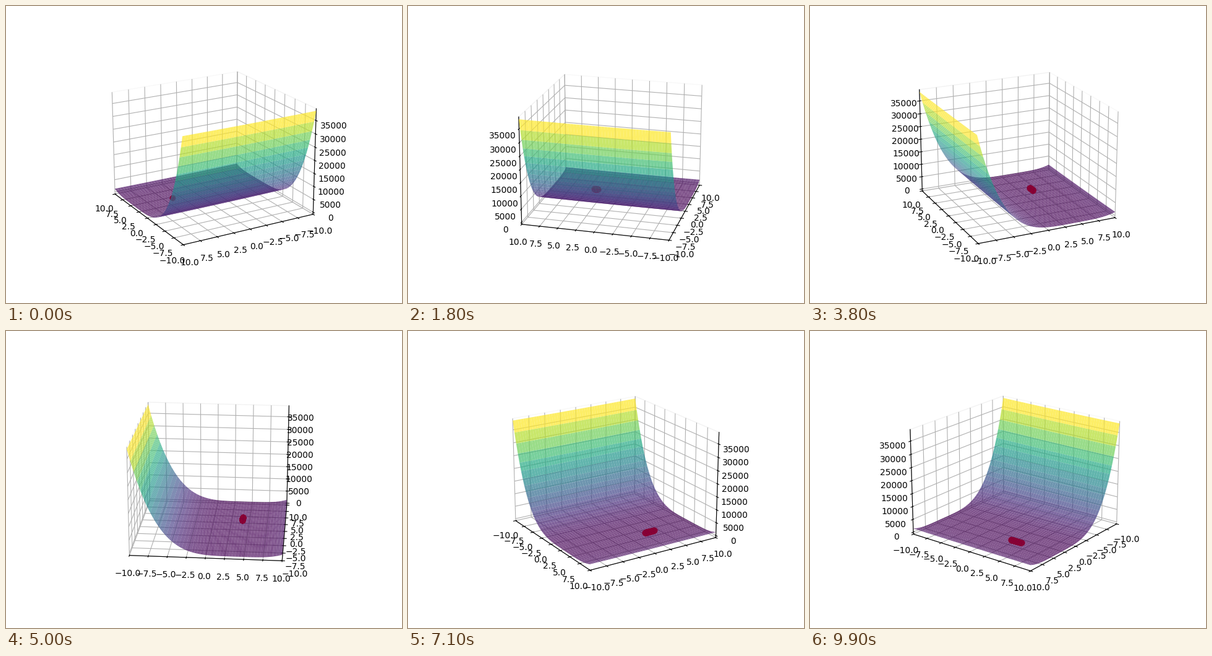
A matplotlib script for the animation above (10 s loop, 640 by 480 pixels).

```python
import matplotlib.pyplot as plt
import numpy as np
from matplotlib.animation import FuncAnimation

FRAMES = 100
RATE = 0.01
LIMIT = 10


def cost(x, y):
    return (x - 4) ** 4 + (y - 2) ** 2


def descend(x, y, steps):
    """Plain gradient descent on the cost surface."""
    path = [(x, y)]
    for _ in range(steps):
        x -= RATE * 4 * (x - 4) ** 3
        y -= RATE * 2 * (y - 2)
        path.append((x, y))
    return np.array(path).T


fig = plt.figure(figsize=(6.4, 4.8), dpi=100)
ax = fig.add_subplot(projection="3d")

side = np.linspace(-LIMIT, LIMIT, 50)
X, Y = np.meshgrid(side, side)
ax.plot_surface(X, Y, cost(X, Y), cmap="viridis", alpha=0.7, linewidth=0)

px, py = descend(4.0, 4.0, FRAMES - 1)
pz = cost(px, py)
trail, = ax.plot(px[:1], py[:1], pz[:1], "ro")

ax.set(xlim=(-LIMIT, LIMIT), ylim=(-LIMIT, LIMIT))
for axis in (ax.xaxis, ax.yaxis, ax.zaxis):
    axis.pane.fill = False


def update(i):
    trail.set_data_3d(px[:i + 1], py[:i + 1], pz[:i + 1])
    ax.view_init(elev=20, azim=150 + 2.5 * i)
    return trail,


anim = FuncAnimation(fig, update, frames=FRAMES, interval=100, repeat=True)
plt.show()
```
